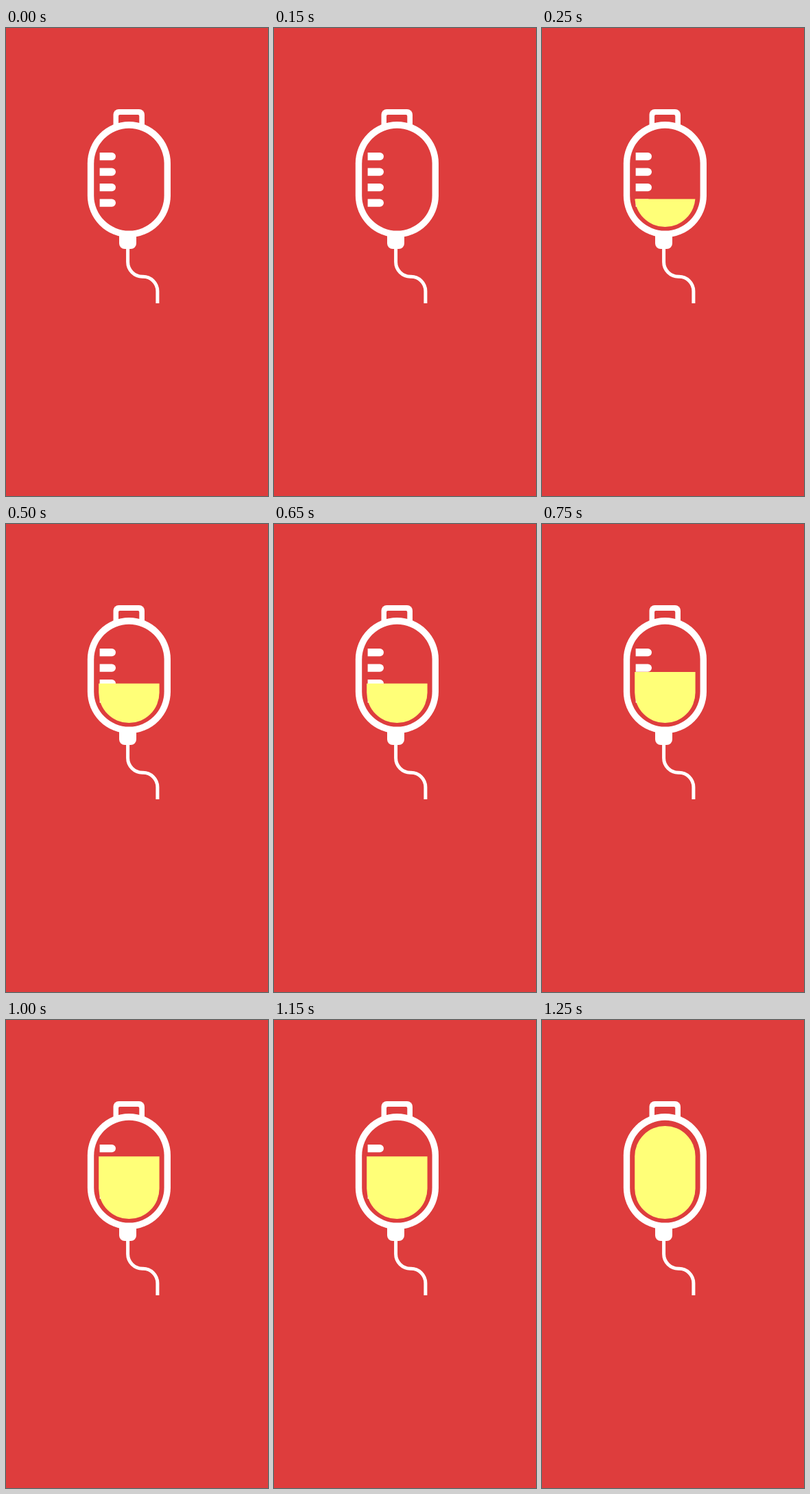
An HTML page with a canvas that plays this animation: 382 by 680 pixels, repeating every 1.5 s.

```html
<!DOCTYPE html>
<html lang="en">
<head>
<meta charset="utf-8">
<title>Drip bag</title>
<style>
  html, body { margin: 0; width: 100%; height: 100%; overflow: hidden; background: #de3d3d; }
  canvas { display: block; width: 382px; height: 680px; }
</style>
</head>
<body>
<canvas id="stage" width="382" height="680"></canvas>
<script>
const ctx = document.getElementById('stage').getContext('2d');
const RED = '#de3d3d', WHITE = '#fff', YELLOW = '#ffff78';
const STEP = 250;
const BOTTOM = 289;
// Liquid surface for each step: empty, four rising levels, full.
const LEVELS = [BOTTOM, 248.5, 231.7, 215, 198.2, 154];

function box(x, y, w, h, r, color) {
  ctx.fillStyle = color;
  ctx.beginPath();
  ctx.roundRect(x, y, w, h, r);
  ctx.fill();
}

function drawHandle() {
  box(156.5, 118, 45.5, 34, [8, 8, 0, 0], WHITE);
  box(164, 126, 30.3, 26, [2, 2, 0, 0], RED);
}

function drawBag() {
  box(118.8, 136, 121.2, 168.2, 60.6, WHITE);
  box(128.2, 145.8, 102.4, 148.8, 51.2, RED);
}

function drawMarks() {
  for (let i = 0; i < 4; i++) {
    box(136.6, 181 + i * 22.5, 23.4, 11.2, [0, 5.6, 5.6, 0], WHITE);
  }
}

function drawLiquid(level) {
  if (level >= BOTTOM) return;
  ctx.save();
  ctx.beginPath();
  ctx.rect(130, level, 100, BOTTOM - level);
  ctx.clip();
  box(135.2, 154, 88.4, BOTTOM - 154, 44.2, YELLOW);
  ctx.restore();
}

function drawTube() {
  box(165, 299, 25, 22, [0, 0, 8, 8], WHITE);
  ctx.strokeStyle = WHITE;
  ctx.lineWidth = 5;
  ctx.beginPath();
  ctx.moveTo(177.6, 318);
  ctx.lineTo(177.6, 340);
  ctx.arcTo(177.6, 361.2, 199.3, 361.2, 21.2);
  ctx.lineTo(199.7, 361.2);
  ctx.arcTo(220.9, 361.2, 220.9, 383, 21.2);
  ctx.lineTo(220.9, 400);
  ctx.stroke();
}

function draw(time) {
  const step = Math.floor(time / STEP) % LEVELS.length;
  ctx.fillStyle = RED;
  ctx.fillRect(0, 0, 382, 680);
  drawHandle();
  drawBag();
  if (step < LEVELS.length - 1) drawMarks();
  drawLiquid(LEVELS[step]);
  drawTube();
}

function tick() {
  draw(performance.now());
  requestAnimationFrame(tick);
}
tick();
</script>
</body>
</html>
```
